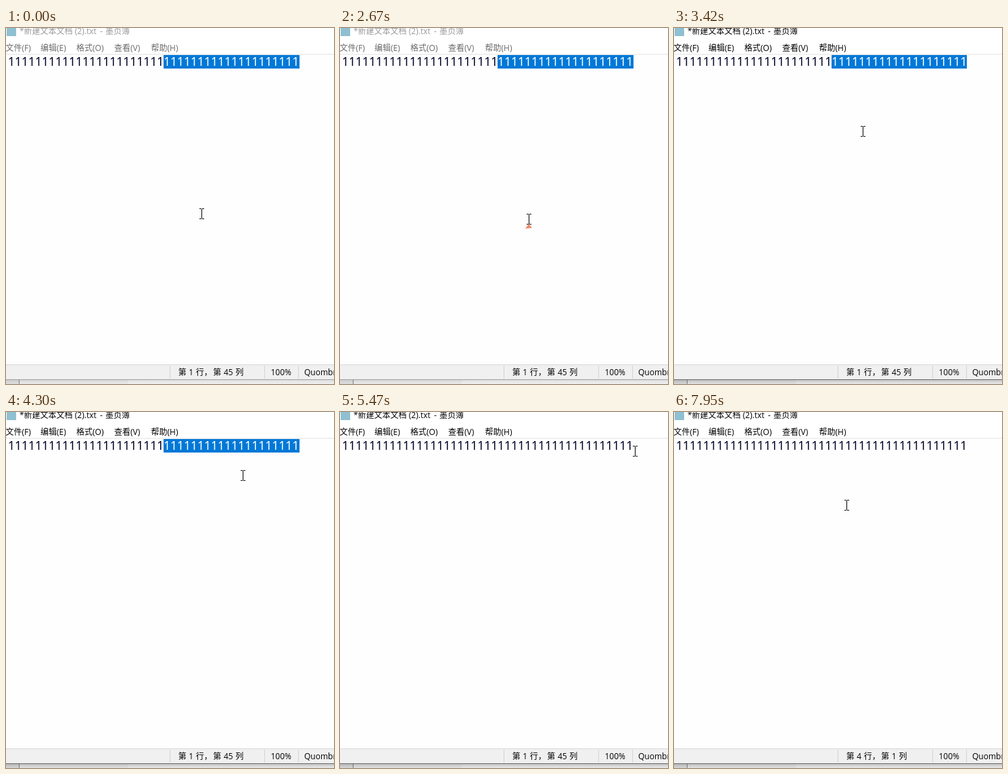
Animation, 485 px wide and 527 px high, one loop 8000 ms. Source, as an HTML page:

```html
<!DOCTYPE html>
<html lang="zh">
<head>
<meta charset="utf-8">
<title>Text editor</title>
<style>
  html, body { margin: 0; width: 100%; height: 100%; overflow: hidden; background: #fff; }
  svg { display: block; width: 485px; height: 527px; }
  text { font: 12px "Open Sans", "Noto Sans CJK SC", sans-serif; fill: #000; white-space: pre; }
  .line { font: 500 17.5px "Noto Sans", sans-serif; fill: #000024; }
  .picked { fill: #fff; }
  .status { word-spacing: .5px; }
  .idle #title text { fill: #999; }
  .idle #menu text { fill: #6a6a6a; }
  #edge { fill: #6a6a6a; }
  .idle #edge { fill: #a0a0a0; }
  .idle #shade { opacity: .5; }
  rect, #beam { shape-rendering: crispEdges; }
</style>
</head>
<body>
<svg id="stage" viewBox="0 0 485 527">
  <linearGradient id="fade" x2="0" y2="1">
    <stop stop-opacity=".2"/>
    <stop offset="1" stop-opacity=".06"/>
  </linearGradient>
  <rect width="485" height="527" fill="#fefefe"/>
  <rect width="485" height="39" fill="#fff"/>
  <rect x="1" width="14" height="12" fill="#8fc0d2"/>
  <g id="title">
    <text y="9"><tspan x="20">*新建文本文档 (2).txt</tspan><tspan x="139">-</tspan><tspan x="147">墨页簿</tspan></text>
  </g>
  <g id="menu">
    <text x="-0.5" y="34">文件(F)</text>
    <text x="51" y="34">编辑(E)</text>
    <text x="104" y="34">格式(O)</text>
    <text x="160" y="34">查看(V)</text>
    <text x="214.5" y="34">帮助(H)</text>
  </g>
  <rect y="38" width="485" height="2" fill="#f0f0f0"/>

  <rect id="select" x="233" y="40" width="200" height="20" fill="#0078d7"/>
  <rect id="caret" x="433" y="40" width="1" height="20"/>
  <text class="line" id="head" x="3" y="56"></text>
  <text class="line" id="tail" x="233" y="56"></text>

  <rect y="498" width="485" height="22" fill="#f0f0f0"/>
  <rect y="498" width="485" height="1" fill="#d7d7d7"/>
  <rect x="242" y="500" width="1" height="19" fill="#d4d4d4"/>
  <rect x="382" y="500" width="1" height="19" fill="#d4d4d4"/>
  <rect x="432" y="500" width="1" height="19" fill="#d4d4d4"/>
  <text class="status" y="514"><tspan id="row" x="254.7"></tspan><tspan id="col" x="306.3"></tspan></text>
  <text x="391.5" y="514">100%</text>
  <text x="441" y="514">Quombra (CRLF)</text>
  <rect id="edge" y="520" width="485" height="1"/>
  <rect y="521" width="485" height="6" fill="#f7f7f7"/>
  <rect y="521" width="19" height="6" fill="#e4e4e4"/>
  <rect x="19" y="521" width="1" height="6" fill="#8a8a8a"/>
  <rect x="20" y="521" width="160" height="6" fill="#f0f0f0"/>
  <rect id="shade" y="521" width="485" height="6" fill="url(#fade)"/>

  <path id="mark" d="M279 290L284 296L274 297Z" fill="#f08a6c"/>
  <path id="beam" d="M-3-8h3v1h1v-1h3v1h-3v14h3v1h-3v-1h-1v1h-3v-1h3v-14h-3z"/>
</svg>
<script>
  const $ = id => document.getElementById(id);
  const LOOP = 8000, FOCUS = 3420, CLICK = 5470, ENTER = 6840;
  const SAMPLE = 132; // usual time between pointer updates
  const BLINK = 512.5, ROW_TIME = 265;

  // pointer strokes: first and last update, bend of the curve, end point
  const strokes = [
    { from: 0, to: 0, bend: [289, 275], end: [289, 275] },
    { from: 1030, to: 1150, bend: [284, 283], end: [280, 294] },
    { from: 2670, to: 2670, bend: [279, 283], end: [279, 283] },
    { from: 2810, to: 3170, bend: [274, 225], end: [279, 153] },
    { from: 3700, to: 4300, bend: [241, 224], end: [350, 94] },
    { from: 4450, to: 4950, bend: [385, 75], end: [427, 62] },
    { from: 5100, to: 5220, bend: [432, 60], end: [436, 58] },
    { from: 5870, to: 6140, bend: [433, 58], end: [433, 64] },
    { from: 6690, to: 6690, bend: [431, 65], end: [431, 65] },
    { from: 6840, to: 7950, bend: [425, 80], end: [255, 138] }
  ];

  const show = (id, on) => $(id).setAttribute("visibility", on ? "visible" : "hidden");

  function pointer(t) {
    const i = strokes.findLastIndex(s => t >= s.from);
    const { from, to, bend, end } = strokes[i];
    const start = i ? strokes[i - 1].end : end;
    const gaps = Math.round((to - from) / SAMPLE);
    const done = gaps ? Math.floor((t - from) / (to - from) * gaps) : 0;
    const p = Math.min(1, (done + 1) / (gaps + 1)), q = 1 - p;
    return end.map((e, k) => Math.round(q * q * start[k] + 2 * p * q * bend[k] + p * p * e));
  }

  function draw(t) {
    $("beam").setAttribute("transform", `translate(${pointer(t)})`);
    show("mark", t >= 2670 && t < 2810);

    $("stage").classList.toggle("idle", t < FOCUS);
    const selected = t < CLICK;
    show("select", selected);
    $("tail").classList.toggle("picked", selected);
    const lit = Math.floor((t - FOCUS) / BLINK) % 2 !== 0;
    show("caret", t < FOCUS || (t < 6420 && lit));
    $("caret").setAttribute("fill", selected ? "#0078d7" : "#000");

    const down = t < ENTER ? 0 : Math.min(3, 1 + Math.floor((t - ENTER) / ROW_TIME));
    $("row").textContent = `第 ${1 + down} 行，`;
    $("col").textContent = `第 ${down ? 1 : 45} 列`;
  }

  function tick() {
    draw(performance.now() % LOOP);
    requestAnimationFrame(tick);
  }

  $("head").textContent = "1".repeat(23);
  $("tail").textContent = "1".repeat(20);
  tick();
</script>
</body>
</html>
```
